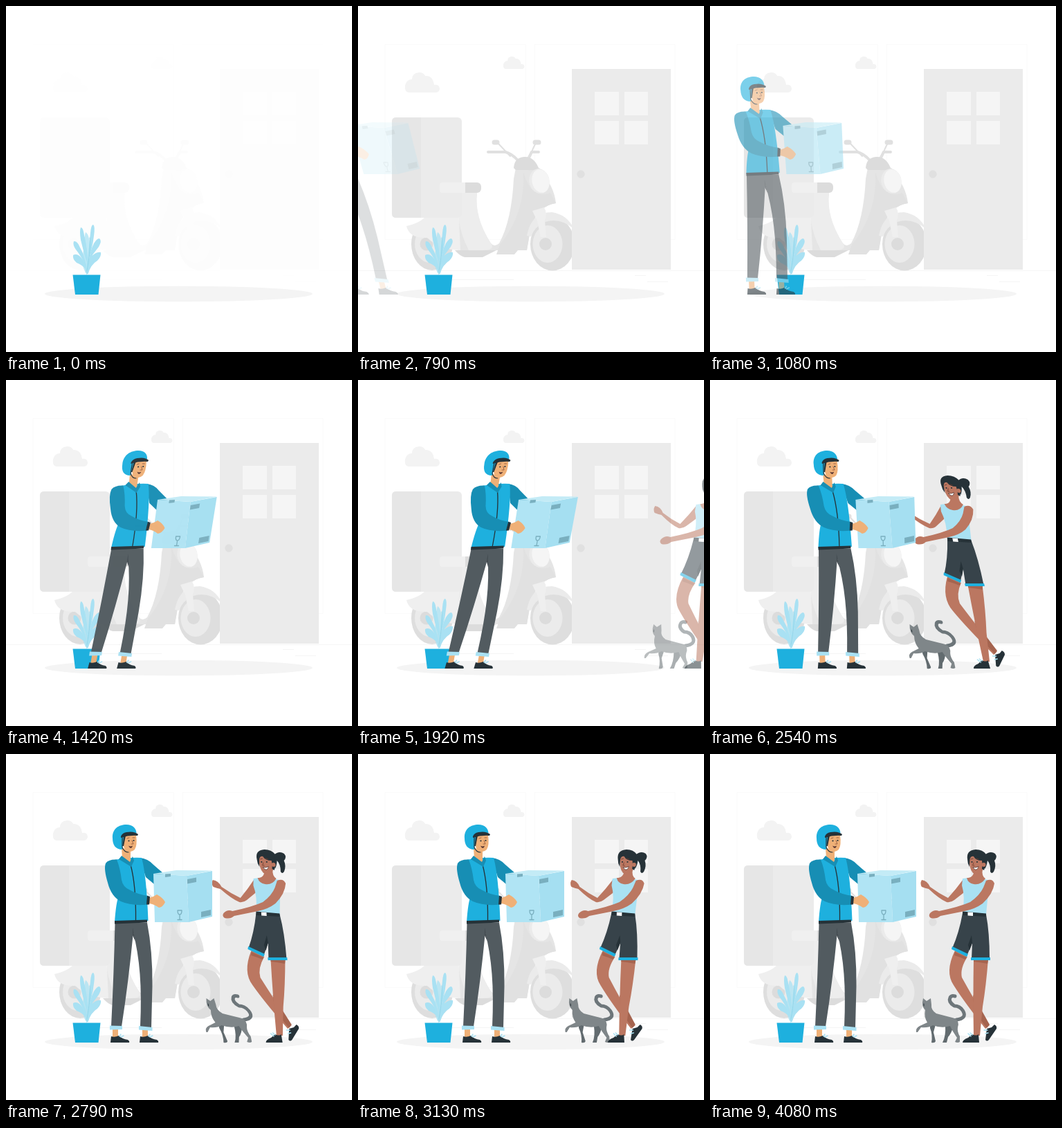
Recreate the animation shown at these times as an HTML page. Size 500x500 px, loop 4.12 s.

```html
<!DOCTYPE html>
<html lang="en">
<head>
<meta charset="utf-8">
<title>Doorstep delivery</title>
<style>
  html, body { margin: 0; width: 100%; height: 100%; overflow: hidden; background: #fff; }
  svg { display: block; width: 100vw; height: 100vh; }
  .sky { fill: #1eb0de; } .teal { fill: #178eb4; } .ice { fill: #a9e1f3; }
  .ink { fill: #263238; } .skin { fill: #efb077; } .brown { fill: #bb7761; }
  .slate { fill: #525b60; } .fur { fill: #7f8689; } .furDark { fill: #626b6f; }
  .line { fill: none; stroke-linecap: round; stroke-linejoin: round; }
</style>
</head>
<body>
<svg viewBox="0 0 500 500">
  <ellipse cx="249.500" cy="416" rx="193.500" ry="11.300" fill="#f4f4f4"/>

  <g id="scene">
    <g fill="none" stroke="#fafafa">
      <path d="M39 337.500V55.500H242.500V337.500ZM255 337.500V55.500H458V337.500Z"/>
      <path d="M0 382.500H500M400 389.500H416M418 398.500H448M118 395.500H225" stroke="#f5f5f5"/>
    </g>
    <g fill="#f3f3f3">
      <path id="cloud" d="M73 125Q67 124 68 115Q70 106 78 106Q78 97 88 96Q95 96 97 101Q108 100 110 114Q117 113 118 119Q118 124 113 125Z"/>
      <use href="#cloud" transform="translate(168.500 13.500) scale(.61 .62)"/>
    </g>

    <!-- scooter -->
    <ellipse cx="107" cy="344" rx="30" ry="38" fill="#dedede"/>
    <ellipse cx="104" cy="344" rx="22" ry="27" fill="#ebebeb"/>
    <circle cx="99" cy="344" r="9.500" fill="#dcdcdc"/>
    <path d="M140 353H200L180 363H154Q147 361 140 353Z" fill="#dcdcdc"/>
    <path d="M146 270H172Q167 305 192 343Q197 349 204 343Q222 310 225 250L228 234H262Q284 262 286 285Q262 288 250 318L244 353H145Z" fill="#e5e5e5"/>
    <path d="M239 240Q242 300 205 345L200 359H226L231 353H244L250 318Q262 288 286 285L278 270Q250 280 239 240Z" fill="#e1e1e1"/>
    <path d="M148 270H172Q168 305 192 343Q199 353 180 353H160Q138 310 148 270Z" fill="#ededed"/>
    <path d="M70 318Q95 312 100 300Q110 279 124 278Q140 285 146 310L148 353Q118 352 100 335Q74 336 70 318Z" fill="#efefef"/>
    <rect x="49" y="161" width="101" height="145" rx="6" fill="#ebebeb"/>
    <path d="M91 161V306H55Q49 306 49 300V167Q49 161 55 161Z" fill="#e6e6e6"/>
    <rect x="140" y="255" width="38" height="15" rx="6" fill="#dcdcdc"/>
    <path d="M121 255H155V270H121Q118 270 118 266V259Q118 255 121 255Z" fill="#f0f0f0"/>
    <g class="line" stroke="#e0e0e0" stroke-width="4">
      <path d="M188 211H213Q222 213 232 224M261 211H251L246 221"/>
      <path d="M202 198L220 217M257 198Q252 207 250 214" stroke-width="2"/>
      <path d="M197 197H201M256 197H261" stroke-width="7"/>
    </g>
    <path d="M225 234Q226 219 240 218Q254 217 261 234Q257 238 245 237H228Z" fill="#dcdcdc"/>
    <ellipse cx="262" cy="253" rx="14.500" ry="18" transform="rotate(-12 262 253)" fill="#ebebeb"/>
    <ellipse cx="264" cy="253" rx="12.500" ry="17" transform="rotate(-12 264 253)" fill="#f5f5f5"/>
    <ellipse cx="281" cy="344" rx="32" ry="38.500" fill="#dedede"/>
    <ellipse cx="274" cy="344" rx="21.500" ry="27" fill="#ebebeb"/>
    <circle cx="271" cy="344" r="9" fill="#dcdcdc"/>
    <path d="M244 332Q250 298 280 298Q302 301 312 322Q290 304 268 313Q255 320 250 333Z" fill="#ebebeb"/>
    <path d="M252 296L269 291Q274 300 270 310L272 334H264L259 311Z" fill="#efefef"/>

    <rect x="309" y="91" width="143" height="290" fill="#ebebeb"/>
    <path d="M342 124H377V158H342ZM385 124H419V158H385ZM342 166H377V200H342ZM385 166H419V200H385Z" fill="#f5f5f5"/>
    <circle cx="322" cy="243" r="5.700" fill="#e0e0e0"/>
  </g>

  <!-- plant -->
  <g class="line" stroke="#a9e1f3">
    <path d="M117 386Q116 372 101 364M116 384Q116 365 101 345M118 386Q118 350 110 324" stroke-width="2"/>
    <path d="M118 386Q120 368 133 360M118 384Q119 366 132 341M118 386Q119 355 125 320" stroke-width="2"/>
  </g>
  <g class="ice">
    <path d="M97 360Q103 357 109 364Q116 372 116 381Q110 374 102 371Q96 366 97 360Z"/>
    <path d="M98 340Q103 339 107 349Q114 361 115 375Q109 362 101 352Q96 345 98 340Z"/>
    <path d="M108 320Q112 320 113 333Q118 350 116 370Q111 350 108 338Q106 325 108 320Z"/>
    <path d="M126 316Q129 318 127 332Q125 350 119 366Q120 345 122 328Q123 316 126 316Z"/>
    <path d="M135 336Q139 339 134 348Q126 358 120 367Q121 355 127 343Q132 335 135 336Z"/>
    <path d="M137 356Q138 362 132 368Q123 373 118 388Q114 374 122 363Q131 354 137 356Z"/>
    <path d="M115 327Q120 329 121 345Q120 370 117 389Q106 372 113 350Q112 335 115 327Z" opacity=".75"/>
  </g>
  <path d="M121 335Q123 350 117 383" class="line" stroke="#8ed3e8" stroke-width=".8"/>
  <path d="M96.500 388.500H136.500L133.500 417H100Z" class="sky"/>

  <g id="cat">
    <path d="M318 386L326 391L323 402L326 415Q325 418 320 417Q322 406 318 396ZM340 392L352 392Q349 404 344 409L342 417H336Q341 408 340 392Z" class="furDark"/>
    <path d="M356 384Q372 382 365.500 371Q361 364 353 364Q344 358 347 352Q349 348.500 354 350" class="line" stroke="#6d767a" stroke-width="5"/>
    <path d="M308 353L313 357L319 353L320 362Q319 370 327 375Q342 379 354 382Q361 386 358 395Q357 401 361 408L361 416Q358 418 354 416L357 410Q350 400 347 393Q335 397 322 392Q315 396 305 395L300 402H298Q297 396 303 393L314 388Q309 380 311 370Q305 365 308 353Z" class="fur"/>
    <path d="M309 361V364" class="line" stroke="#263238" stroke-width="1"/>
  </g>

  <g id="woman">
    <path d="M366 181Q355 196 344 208Q330 201 318 192Q314 183 306 182Q303 187 306 192Q311 194 316 195Q332 210 342 214Q348 215 353 211L371 197Z" class="brown"/>
    <path d="M354 284L372 293Q361 310 364 323Q380 352 404 392L398 397Q367 358 352 334Q339 315 354 284Z" class="brown"/>
    <path d="M380 348L404 391L400 396L382 372Z" fill="#a5644f"/>
    <path d="M400 397L407 395L411 391Q415 393 414 397L403 413Q400 416 398 413Z" class="ink"/>
    <path d="M381 296L402 296Q399 335 394 365L390 407H381Q380 350 381 296Z" class="brown"/>
    <path d="M381 298H402L401 303Q390 301 381 300ZM354 286L371 294L369 297Q360 293 353 291Z" fill="#a5644f"/>
    <path d="M365 417Q365 413 373 410L379 405Q385 408 388 405L389 417Z" class="ink"/>
    <path d="M377 408L373 404M379 406L376 403M401 399L396 399M402 403L398 404" class="line" stroke="#a9e1f3" stroke-width="1.500"/>
    <path d="M365 230L399 232Q404 258 404 296H378L379 273L371 292L350 281Q360 258 365 230Z" fill="#37434a"/>
    <path d="M378 262L379 273L375 284L373 276Z" fill="#263238"/>
    <path d="M350 278L373 289L371 293L349 282ZM377 294H405V298H377Z" class="sky"/>
    <path d="M365 180Q381 177 402 182Q407 190 402 200L399 232L365 229Q369 206 364 190Z" class="ice"/>
    <path d="M373 179Q382 178 382 165L394 166Q392 176 398 180Q391 190 381 188Q373 187 371 179Z" class="brown"/>
    <path d="M365 227.500L399 230.500V235L365 233Z" class="ink"/>
    <path d="M372.500 228.500L380 229V234L372.500 233.500Z" fill="#fff"/>
    <path d="M399 183Q408 179 411 187Q409 202 394 216Q383 224 368 227L333 234Q327 239 319 237Q315 234 318 230Q324 224 331 227Q360 221 376 214Q390 204 395 193Z" class="brown"/>
    <path d="M375 149Q374 166 380 172Q388 176 394 168L399 157Q395 146 382 145Z" class="brown"/>
    <path d="M372 152Q370 139 384 138Q394 138 399 145Q400 156 396 168L393 166Q394 160 393 154Q384 154 381 148Q377 147 375.500 152Q375 157 375 163Q372 158 372 152Z" class="ink"/>
    <path d="M397 146Q405 139 412 144Q416 149 411 154Q414 162 410 170Q407 174 405 170Q406 160 401 154Q400 162 397 166Z" class="ink"/>
    <circle cx="395.500" cy="160" r="3" class="brown"/>
    <g class="ink"><circle cx="378.500" cy="156" r="1.100"/><circle cx="386" cy="156" r="1.100"/></g>
    <path d="M380 163.500Q384 165 388 162.500Q387 167.500 383.500 167Q381 166 380 163.500Z" fill="#fff" stroke="#4b2c28" stroke-width=".7"/>
    <path d="M381 157L379.500 161H382M377 152L380 151M385 151L388 152" class="line" stroke="#6b3a2d" stroke-width=".8"/>
  </g>

  <g id="man">
    <path d="M193 150Q205 151 213 160L228 173L214 188L202 178Z" class="teal"/>
    <path d="M154 397H162V409H154ZM197 398H205V409H197Z" class="skin"/>
    <g id="shoe">
      <path d="M152 408Q157 410 163 407Q168 412 176 413Q179 415 178 417H151Z" class="ink"/>
      <path d="M164 408L166 405M166 409L170 407" class="line" stroke="#a9e1f3" stroke-width="1.500"/>
    </g>
    <use href="#shoe" x="42"/>
    <path d="M157.500 244H186L184 257Q177 330 167 394H152Q156 315 157.500 244Z" class="slate"/>
    <path d="M176 244H204Q212 285 211.500 335L210 396L194 394Q196 350 193.500 318Q191 285 183 254Z" class="slate"/>
    <path d="M183 251L187 271L183 262Z" fill="#434b50"/>
    <path d="M150 392.500L168 393V398L150 398.500ZM192 393L211.500 395V400L192 398.500Z" class="ice"/>
    <path d="M157 153Q178 149 196 150Q203 175 205.500 241L157 243Q159 214 163 205Z" class="sky"/>
    <path d="M157 241L204 239.500V243.500L157 245.500Z" class="ink"/>
    <path d="M180 160Q188 190 187.500 240" class="line" stroke="#263238" stroke-width="1.300"/>
    <path d="M167 136L180 138L180 152L182 160L168 150Z" class="skin"/>
    <path d="M167 147L179 156L181 163L163 152ZM179 156L183 148L185 154L181 163Z" class="teal"/>
    <path d="M160 152.500Q148 152 144 158Q141 166 147 186Q152 206 166 213Q182 220 205 217.500L206 205Q190 203 178 196Q169 192 167 182Q165 165 160 152.500Z" class="teal"/>
    <path d="M168 117H188Q190 132 186 138Q180 144 173 139Q168 134 168 117Z" class="skin"/>
    <path d="M168 118H173L170 133H167Z" class="ink"/>
    <path d="M154 122C153 108 163 102 174 102C183 102 188 107 188.500 114L170 119L168 138C158 138 154 131 154 122Z" class="sky"/>
    <path d="M166 119Q168 114 174 113Q185 111 191 116L190 118Q178 117 166 121Z" class="ink"/>
    <path d="M168 120V135Q171 142 177 142" class="line" stroke="#263238" stroke-width="1.200"/>
    <g class="ink"><circle cx="177.500" cy="125.500" r="1.100"/><circle cx="184.500" cy="125" r="1.100"/></g>
    <path d="M177 132.500Q180 134.500 183 132.500Q182 136 180 136Q178 135 177 132.500Z" fill="#573532"/>
    <path d="M182 125L184 130L181 130M175 122L178 121M183 121L186 121" class="line" stroke="#8c5238" stroke-width=".8"/>

    <!-- parcel -->
    <path d="M213 173L261 176L264 243L215 243Z" fill="#b0e4f4"/>
    <path d="M261 176L298 169V235L264 243Z" fill="#a5dff1"/>
    <path d="M213 173L246 168L298 168.500L261 176Z" fill="#c3ebf6"/>
    <path d="M230 173.500L238 173V177L230 178ZM262 181L275 178.500V185L262 187.500ZM282 228L296 225V233L282 236Z" fill="#79afbf"/>
    <path d="M248 226H254Q254 232 251 232T248 226M251 232V239M248 239.500H254" class="line" stroke="#79afbf" stroke-width="1.300"/>
    <path d="M207 208Q214 206 218 203Q227 208 230 214Q227 221 221 222Q214 217 207 216Z" class="skin"/>
    <path d="M204 205L208 206L207 217.500L203 217.500Z" class="ink"/>
  </g>
</svg>

<script>
const LOOP = 4120;
const $ = id => document.getElementById(id);
const clamp = v => Math.max(0, Math.min(1, v));
const mix = (a, b, p) => a + (b - a) * p;

// cubic-bezier(.36, -.01, .5, 1.38)
const curve = (s, a, b) => 3 * (1 - s) ** 2 * s * a + 3 * (1 - s) * s * s * b + s ** 3;
function ease(x) {
  let lo = 0, hi = 1;
  for (let i = 0; i < 24; i++) {
    const mid = (lo + hi) / 2;
    if (curve(mid, .36, .5) < x) lo = mid; else hi = mid;
  }
  return curve(lo, -.01, 1.38);
}

// Each entrance slides in, then sways through these skew angles.
const stops = [0, .6, .8, 1], skews = [20, -10, 2, 0], shifts = [-250, 0, 0, 0];
const actors = [
  { el: $('man'), side: 1, start: 448, length: 2500, centerY: 259.5 },
  { el: $('cat'), side: -1, start: 1251, length: 2808, centerY: 383 },
  { el: $('woman'), side: -1, start: 1443, length: 2000, centerY: 277 }
];

function pose({ el, side, start, length, centerY }, t) {
  const x = clamp((t - start) / length);
  const i = x < .6 ? 0 : x < .8 ? 1 : 2;
  const p = ease((x - stops[i]) / (stops[i + 1] - stops[i]));
  const angle = side * mix(skews[i], skews[i + 1], p);
  const shift = side * mix(shifts[i], shifts[i + 1], p);
  const dx = shift - Math.tan(angle * Math.PI / 180) * centerY;
  el.setAttribute('transform', `translate(${dx} 0) skewX(${angle})`);
  el.setAttribute('opacity', i ? 1 : clamp(p));
}

function draw() {
  const t = performance.now() % LOOP;
  $('scene').setAttribute('opacity', t < 250 ? .07 : mix(.7, 1, clamp((t - 250) / 210)));
  actors.forEach(actor => pose(actor, t));
  requestAnimationFrame(draw);
}
draw();
</script>
</body>
</html>
```
